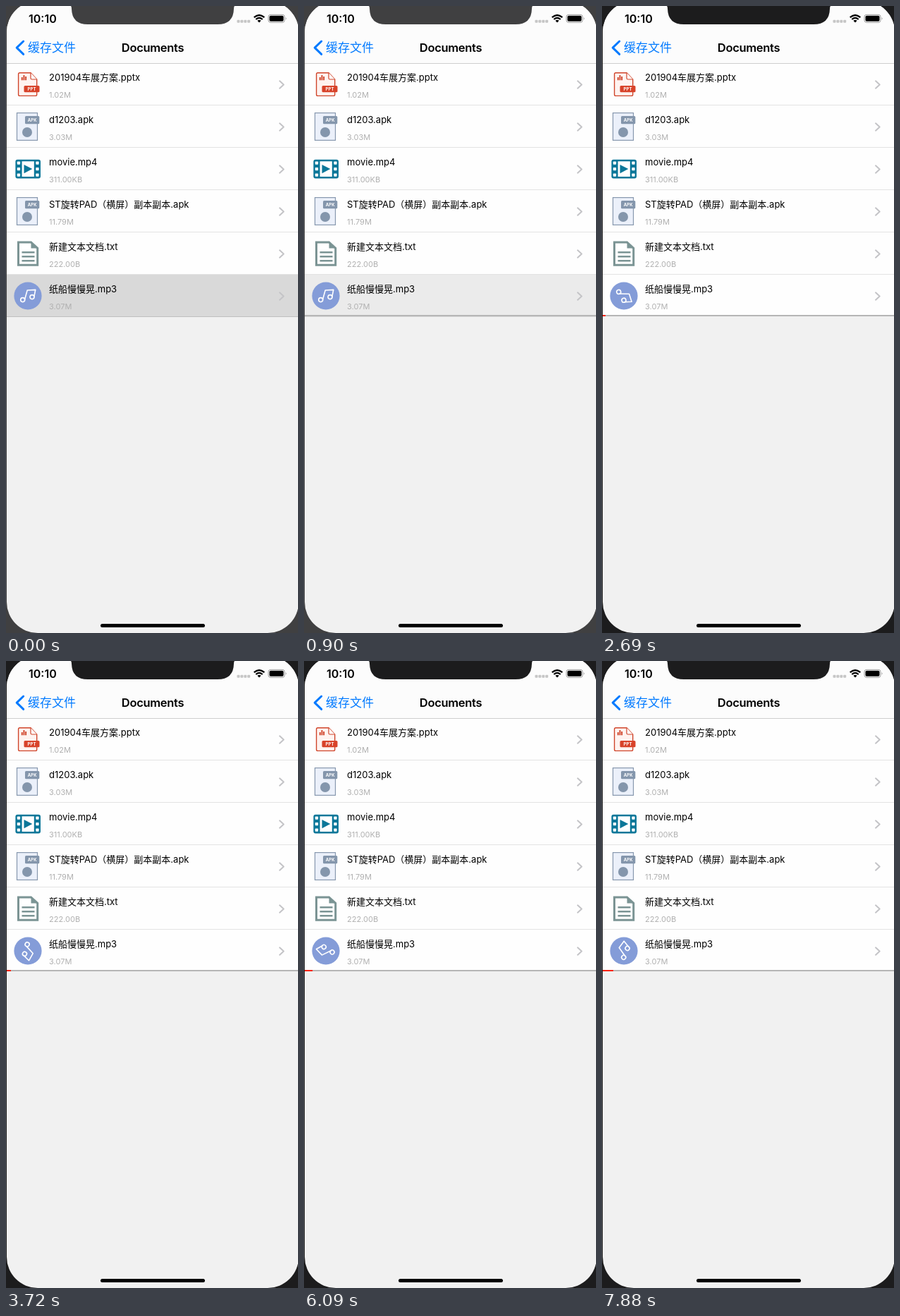
Write an HTML page that moves like this. It is 414x889 px and loops after 8000 ms.

```html
<!DOCTYPE html>
<html lang="zh-CN">
<head>
<meta charset="utf-8">
<title>Documents</title>
<style>
  html, body { margin: 0; width: 100%; height: 100%; overflow: hidden; }
  svg { display: block; width: 100%; height: 100%; }
  text { font-family: Inter, "Noto Sans CJK SC", "Noto Sans CJK", sans-serif; white-space: pre; }
  .name { font-size: 13px; fill: #000; }
  .size { font-size: 11px; fill: #b0b0b0; }
  .tag { font-size: 6px; font-weight: 700; fill: #fff; text-anchor: middle; }
  .line { fill: none; stroke-linecap: round; stroke-linejoin: round; }
</style>
</head>
<body>
<svg viewBox="0 0 414 889" xmlns="http://www.w3.org/2000/svg">
  <defs>
    <clipPath id="screen"><rect x="1" y="-7" width="414" height="896" rx="44"/></clipPath>

    <g id="ppt">
      <path d="M19.5 94.7H35L43.7 104V125.500Q43.700 127.400 41.800 127.400H19.500Q17.600 127.400 17.600 125.500V96.600Q17.600 94.700 19.500 94.700Z" fill="#fff3f0" stroke="#d0452b" stroke-width="1.4"/>
      <path d="M35 94.700V102.200Q35 104 36.800 104H43.700" fill="#fff" stroke="#d0452b" stroke-width="1.200"/>
      <path d="M21.800 101h1.900v4.200h-1.900zM24.500 98h1.900v7.200h-1.900zM27.200 100h1.900v5.200h-1.900z" fill="#d0452b"/>
      <rect x="25.500" y="113" width="22" height="9.300" rx="1.500" fill="#d8432a"/>
      <text class="tag" x="36.500" y="119.800">PPT</text>
    </g>

    <g id="apk">
      <rect x="15.500" y="91.600" width="29" height="38.800" fill="#ebf0fa" stroke="#8798ae" stroke-width="1.200"/>
      <rect x="27" y="96" width="20.300" height="11.200" rx="1.500" fill="#8496ac"/>
      <text class="tag" x="37.200" y="103.800">APK</text>
      <circle cx="30" cy="119" r="7" fill="#8496ac"/>
    </g>

    <g id="film">
      <rect x="13.400" y="97.800" width="35.600" height="26.600" rx="3" fill="#0b7799"/>
      <path d="M22.600 100.300h17.200v21.600H22.600z" fill="#fff"/>
      <path d="M25.500 105L37.300 111.100 25.500 117.200z" fill="#0b7799"/>
      <g id="holes" fill="#fff">
        <rect x="15.800" y="100.500" width="4.300" height="4.300" rx=".8"/>
        <rect x="15.800" y="109" width="4.300" height="4.300" rx=".8"/>
        <rect x="15.800" y="117.400" width="4.300" height="4.300" rx=".8"/>
      </g>
      <use href="#holes" x="26.500"/>
    </g>

    <g id="txt" fill="none" stroke="#7b9494">
      <path d="M17.500 95H35.500L44.700 103.500V127.200H17.500Z" fill="#fff" stroke-width="3"/>
      <path d="M35.500 93.500V103.500H46Z" fill="#7b9494" stroke="none"/>
      <path d="M22.500 109.200H40.500M22.500 115.200H40.500M22.500 121.200H40.500" stroke-width="2.600"/>
    </g>

    <g id="music">
      <circle cx="31" cy="111" r="19.600" fill="#849cd8"/>
      <g id="note" class="line" stroke="#fff" stroke-width="1.600">
        <circle cx="23.700" cy="116.600" r="3"/>
        <circle cx="37" cy="112.600" r="3"/>
        <path d="M26.600 116L30.200 103 41.800 102.400 39.800 112"/>
      </g>
    </g>
  </defs>

  <rect id="frame" width="414" height="889"/>
  <g clip-path="url(#screen)">
    <rect width="414" height="889" fill="#f1f1f1"/>
    <rect width="414" height="81" fill="#fcfcfc"/>
    <rect y="81" width="414" height="359" fill="#fefefe"/>
    <rect y="81" width="414" height="1" fill="#cfcfcf"/>
    <g id="lit">
      <rect y="380" width="414" height="61" fill="#d9d9d9"/>
      <rect y="440" width="414" height="1" fill="#bfbfbf"/>
    </g>
    <g id="rows"></g>
    <g id="player">
      <rect y="438" width="414" height="2" fill="#b6b6b6"/>
      <rect id="bar" x="1" y="438" height="2" fill="#fb2312"/>
    </g>

    <path class="line" d="M24.700 50L15.200 59.200 24.700 68.400" stroke="#007aff" stroke-width="3"/>
    <text x="31" y="65" font-size="17" fill="#007aff">缓存文件</text>
    <text x="208" y="65" font-size="16.500" font-weight="600" letter-spacing="-.3" text-anchor="middle">Documents</text>

    <text x="32" y="23.500" font-size="16" font-weight="600">10:10</text>
    <g fill="#c6c6c6">
      <rect x="327.500" y="19.700" width="4" height="4" rx="1"/>
      <rect x="332.400" y="19.700" width="4" height="4" rx="1"/>
      <rect x="337.300" y="19.700" width="4" height="4" rx="1"/>
      <rect x="342.200" y="19.700" width="4" height="4" rx="1"/>
    </g>
    <g fill="none" stroke="#000" stroke-width="2.300">
      <path d="M351.700 16.200Q359 9.700 366.300 16.200"/>
      <path d="M354.300 19Q359 14.800 363.700 19"/>
      <path d="M356.400 20.800Q359 18.600 361.600 20.800L359 23.500Z" fill="#000" stroke="none"/>
    </g>
    <rect x="372" y="12.300" width="23" height="11" rx="3" fill="none" stroke="#9a9a9a"/>
    <rect x="373.500" y="13.800" width="20" height="8" rx="1.700"/>
    <path d="M396.700 16Q398.600 17.800 396.700 19.600Z" fill="#9a9a9a"/>
    <rect x="134" y="876" width="148" height="5" rx="2.500"/>
  </g>
  <path id="notch" d="M92 0Q93 1 93 4Q93.500 26 116 26H300Q322.500 26 323 4Q323 1 324 0Z"/>
</svg>
<script>
  const LOOP = 8000, STEP = 148.54;
  const $ = id => document.getElementById(id);

  const files = [
    ["ppt", "201904车展方案.pptx", "1.02M"],
    ["apk", "d1203.apk", "3.03M"],
    ["film", "movie.mp4", "311.00KB"],
    ["apk", "ST旋转PAD（横屏）副本副本.apk", "11.79M"],
    ["txt", "新建文本文档.txt", "222.00B"],
    ["music", "纸船慢慢晃.mp3", "3.07M"]
  ];

  $("rows").innerHTML = files.map(([icon, name, size], i) => `
    <g transform="translate(0 ${i * 60})">
      <use href="#${icon}"/>
      <text class="name" x="61" y="105.500">${name}</text>
      <text class="size" x="61" y="130">${size}</text>
      <path class="line" d="M388 106.300L393.700 111.500 388 116.700" stroke="#c4c4c7" stroke-width="2"/>
      ${i < 5 ? '<rect y="140" width="414" height="1" fill="#e3e3e3"/>' : ""}
    </g>`).join("");

  const clamp = x => Math.min(1, Math.max(0, x));

  const held = t => t < 750 ? 0 : 750 + Math.floor((t - 740) / STEP) * STEP;

  function draw(time) {
    const t = held(time);
    const dark = t < 1300 ? "#404041" : "#1c1c1d";
    $("frame").setAttribute("fill", dark);
    $("notch").setAttribute("fill", dark);

    $("lit").setAttribute("opacity", 1 - clamp((t - 700) / 400));
    $("player").setAttribute("visibility", t < 750 ? "hidden" : "visible");

    // Playback drives both the spinning note and the progress bar.
    const played = Math.max(0, t - 1010) / 1000;
    $("note").setAttribute("transform", `rotate(${played * 45} 31 111)`);
    const width = played ? Math.max(4, 0.15 + played * 2.16) : 0;
    $("bar").setAttribute("width", width);
  }

  const start = performance.now();
  function tick() {
    draw((performance.now() - start) % LOOP);
    requestAnimationFrame(tick);
  }
  tick();
</script>
</body>
</html>
```
